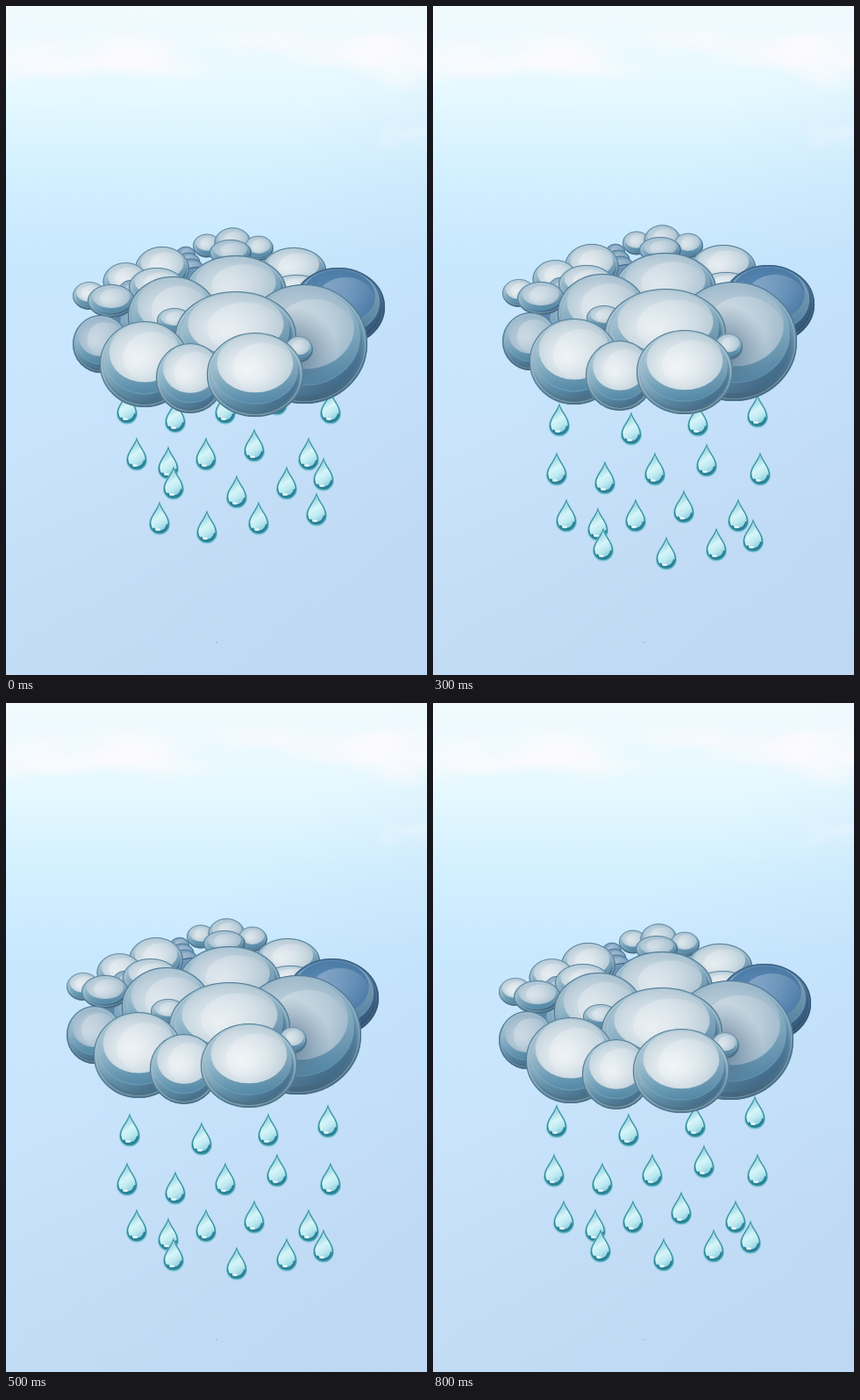
Write an HTML page with a canvas that moves like this. It is 480x762 px and loops after 0.9 s.

```html
<!DOCTYPE html>
<html lang="en">
<head>
<meta charset="utf-8">
<title>Rain cloud</title>
<style>
html, body { margin: 0; width: 100%; height: 100%; overflow: hidden; background: #c8e4fb; }
canvas { display: block; width: 100vw; height: 100vh; }
</style>
</head>
<body>
<canvas id="stage" width="480" height="762"></canvas>
<script>
const W = 480, H = 762, STEP = 100, TAU = Math.PI * 2;

// One value per step: sideways swing of the cloud, height of the rain
const sway = [0, 3, 6, 3, 0, -7, -9, -4, -1];
const rain = [-85, -75, -25, -15, -85, 0, 0, 0, -10];
const FLOOR = 630;

// Each row is evenly spaced, then pushed sideways in the middle by bend
const rows = [
  { y: 486, from: 141, to: 367, count: 4, bend: 8 },
  { y: 542, from: 138, to: 370, count: 5, bend: -4 },
  { y: 595, from: 149, to: 345, count: 5, bend: -19 },
  { y: 628, from: 191, to: 362, count: 4, bend: 17 },
  { y: 668, from: 175, to: 354, count: 4, bend: -7 }
];

let seed = 7;
const random = () => (seed = seed * 16807 % 2147483647) / 2147483647;
const mix = (a, b, t) => a + (b - a) * t;

function layer(w, h, paint) {
  const canvas = document.createElement('canvas');
  canvas.width = w;
  canvas.height = h;
  paint(canvas.getContext('2d'));
  return canvas;
}

// Spreads the colours evenly over the gradient
function blend(gradient, ...colors) {
  colors.forEach((color, i) => gradient.addColorStop(i / (colors.length - 1), color));
  return gradient;
}

function ellipse(c, x, y, rx, ry, fill, stroke, width = 1) {
  c.beginPath();
  c.ellipse(x, y, rx, ry, 0, 0, TAU);
  if (fill) { c.fillStyle = fill; c.fill(); }
  if (stroke) { c.strokeStyle = stroke; c.lineWidth = width; c.stroke(); }
}

// Fills an ellipse in unit coordinates, so that gradients stretch with it
function softEllipse(c, x, y, rx, ry, gradient) {
  c.save();
  c.translate(x, y);
  c.scale(rx, ry);
  ellipse(c, 0, 0, 1, 1, gradient);
  c.restore();
}

function paintSky(c) {
  c.fillStyle = blend(c.createLinearGradient(0, 0, 0, H), '#f1fafe', '#e6f9ff',
    '#d3f0ff', '#c8e8ff', '#c8e6fe', '#c9e4fc', '#c8e2fa', '#c7e0f8', '#c6dff7');
  c.fillRect(0, 0, W, H);
  c.fillStyle = blend(c.createLinearGradient(180, 300, 500, 580),
    'rgba(182,208,238,0)', 'rgba(180,206,238,.42)');
  c.fillRect(0, 0, W, H);

  const bank = (x, y, w, h, alpha) => {
    for (let i = 0; i < 12; i++) {
      const white = a => `rgba(253,251,253,${a})`;
      softEllipse(c, x + w * random(), y + h * random(), w * .3, h * .4,
        blend(c.createRadialGradient(0, 0, 0, 0, 0, 1), white(alpha), white(alpha * .5), white(0)));
    }
  };
  bank(-20, 38, 220, 42, .6);
  bank(250, 28, 140, 36, .3);
  bank(365, 32, 130, 52, .55);
  bank(430, 138, 60, 22, .14);
  ellipse(c, 240, 725, .8, .8, '#8ba4b8');
}

function paintCloud(c) {
  const puff = (x, y, rx, ry, dark = .1) => {
    const tone = (light, drop) =>
      `hsl(${202 + 9 * dark} ${27 + 12 * dark}% ${light - drop * dark}%)`;
    const line = Math.min(1.2, .4 + rx / 50);
    ellipse(c, x, y, rx, ry, blend(c.createLinearGradient(x - rx * .2, y - ry, x + rx * .2, y + ry),
      tone(77, 38), tone(72, 38), tone(64, 32), tone(49, 20), tone(39, 10)));
    c.save();
    c.clip();

    // Blue reflections along the lower edge
    ellipse(c, x, y - ry * .02, rx * .92, ry * .89, blend(
      c.createLinearGradient(x - rx, y - ry * .5, x + rx * .5, y + ry),
      'rgba(205,222,230,.5)', 'rgba(110,160,185,.35)', 'rgba(50,92,132,.5)'));
    ellipse(c, x, y - ry * .13, rx * .88, ry * .82, blend(
      c.createLinearGradient(0, y - ry, 0, y + ry * .7),
      'rgba(185,208,219,.5)', 'rgba(150,187,204,.5)', 'rgba(82,140,172,.7)'),
      'rgba(130,185,206,.4)', line);

    // Bright face
    const fy = y - ry * .27, fw = rx * .79, fh = ry * .69;
    softEllipse(c, x, fy, fw, fh, blend(c.createRadialGradient(-.2, .25, .05, -.1, .1, 1.12),
      tone(96, 50), tone(93, 50), tone(88, 47), tone(81, 42)));
    softEllipse(c, x + fw * .2, fy + fh * .15, fw * .8, fh * .85,
      blend(c.createLinearGradient(-.7, -.6, .7, .6), 'rgba(255,255,255,.25)', 'rgba(255,255,255,0)'));
    ellipse(c, x, y, rx - 2.5, ry - 2.5, null, `rgba(180,213,226,${.5 - dark * .45})`, line);
    c.restore();
    ellipse(c, x, y, rx - .4, ry - .4, null, tone(46, 12), line * .85);
  };

  // Puffs running from one [x, y, radius] to another, the middle ones swelling
  const chain = (count, start, end, swell, dark) => {
    for (let i = 0; i < count; i++) {
      const t = i / (count - 1), bulge = swell * Math.sin(Math.PI * t);
      const [x, y, r] = start.map((v, k) => mix(v, end[k], t));
      puff(x, y - bulge, r + bulge, (r + bulge) * .84, dark);
    }
  };

  // Back
  chain(3, [229, 273, 16], [288, 276, 17], 4.5, .18);
  chain(3, [205, 283, 11], [210, 302, 17], 0, .55);
  puff(256, 281, 24, 15, .25);
  puff(250, 360, 130, 65, .6);
  puff(328, 301, 37, 26);
  chain(3, [178, 300, 31], [95, 330, 19], 1);
  puff(142, 328, 15, 16, .4);
  puff(172, 320, 32, 22);
  puff(120, 336, 27, 19, .2);

  // Middle
  puff(331, 320, 28, 14);
  puff(379, 343, 53, 45, .8);
  puff(108, 385, 32, 33, .3);
  puff(262, 326, 58, 42, .16);
  puff(190, 353, 51, 45, .16);
  puff(340, 385, 72, 68, .24);
  softEllipse(c, 326, 396, 52, 54, blend(c.createRadialGradient(0, 0, .1, 0, 0, 1),
    'rgba(58,90,122,.7)', 'rgba(80,112,140,.4)', 'rgba(90,120,145,0)'));

  // Front
  puff(192, 358, 20, 14, .18);
  puff(262, 376, 69, 51, .08);
  puff(334, 391, 16, 15, .18);
  puff(158, 408, 51, 49, .05);
  puff(210, 424, 39, 40, .06);
  puff(284, 420, 55, 48, .03);
}

function paintDrop(c) {
  const tear = (scale, fill) => {
    c.save();
    c.translate(15, 22);
    c.scale(scale, scale);
    c.beginPath();
    c.moveTo(0, -19.5);
    c.bezierCurveTo(2.5, -10, 12, -2, 12, 7.5);
    c.arc(0, 7.5, 12, 0, Math.PI);
    c.bezierCurveTo(-12, -2, -2.5, -10, 0, -19.5);
    c.fillStyle = fill;
    c.fill();
    c.restore();
  };
  tear(1, '#7cc6d4');
  tear(.92, '#2f8799');
  tear(.81, blend(c.createLinearGradient(-8, -8, 8, 16), '#a4dce6', '#d6f5f8', '#bce9f1', '#86cbdb'));
  c.strokeStyle = '#1f7690';
  c.lineWidth = 1.5;
  c.beginPath();
  c.arc(15, 28.5, 8.8, .1, 2.5);
  c.stroke();
  ellipse(c, 13, 35.5, 3, 1.2, '#f2feff');
}

const sky = layer(W, H, paintSky);
const cloud = layer(W, H, paintCloud);
const drop = layer(30, 44, paintDrop);
const stage = document.getElementById('stage').getContext('2d');

function drawRow({ y, from, to, count, bend }, dx, dy) {
  if (y + dy > FLOOR) return;
  for (let i = 0; i < count; i++) {
    const t = i / (count - 1);
    const x = mix(from, to, t) + bend * Math.sin(Math.PI * t) + dx;
    const dip = 10 * Math.sin(i * Math.PI / 2);
    stage.drawImage(drop, Math.round(x) - 15, Math.round(y + dip + dy) - 22);
  }
}

function draw() {
  const step = Math.floor(performance.now() / STEP) % sway.length;
  const swing = sway[step];
  stage.drawImage(sky, 0, 0);
  rows.forEach(row => drawRow(row, Math.max(swing, 0), rain[step]));
  stage.drawImage(cloud, swing, -Math.abs(swing));
  requestAnimationFrame(draw);
}
draw();
</script>
</body>
</html>
```
